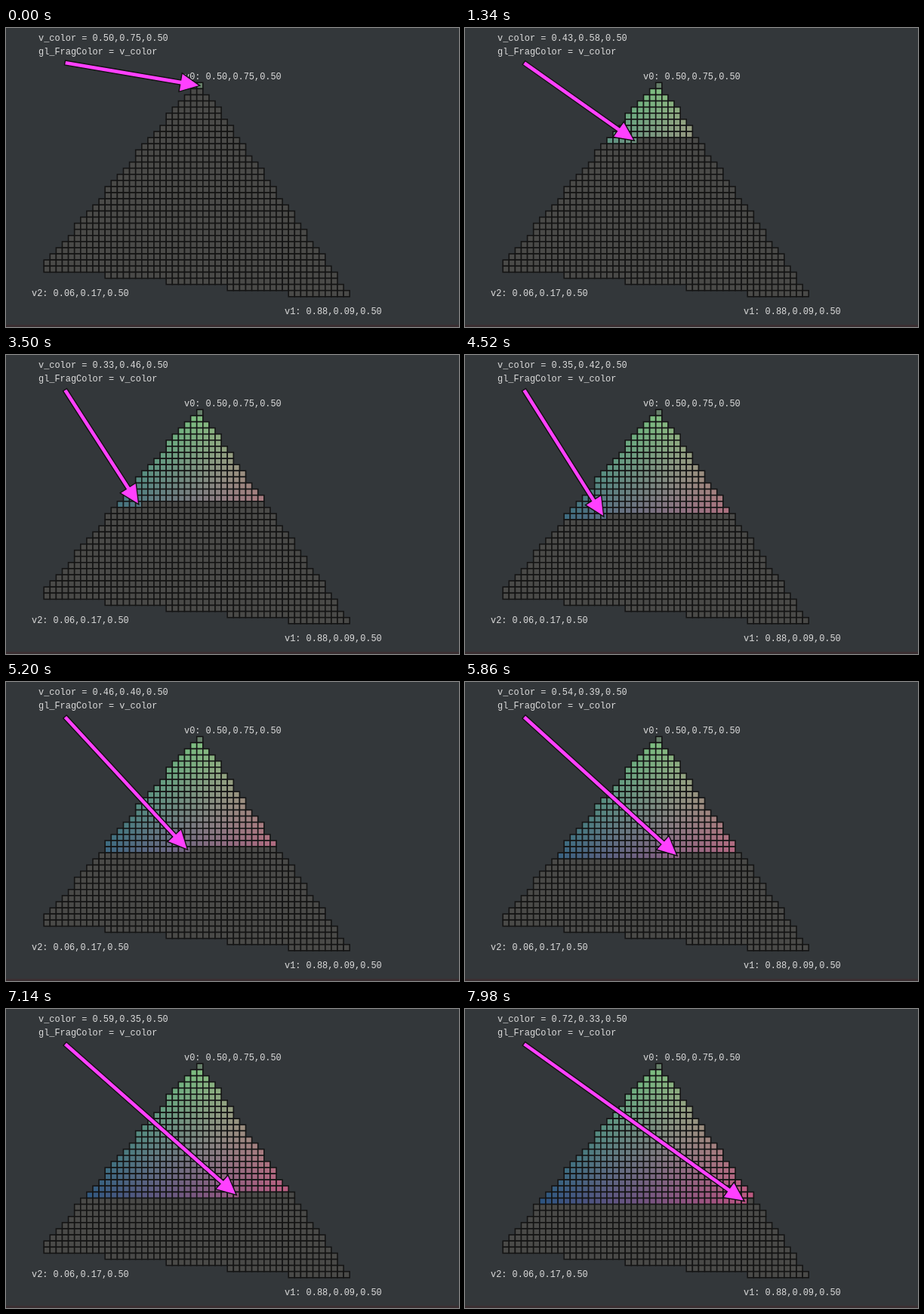
Animation of 600 by 396 pixels, one loop 8 s. Source, as an HTML page with a canvas:

```html
<!DOCTYPE html>
<html lang="en">
<head>
<meta charset="utf-8">
<title>Fragment interpolation</title>
<style>
  html, body { margin: 0; width: 100%; height: 100%; overflow: hidden; background: #33373a; }
  canvas { display: block; width: 600px; height: 396px; }
</style>
</head>
<body>
<canvas id="stage" width="600" height="396"></canvas>
<script>
const ctx = document.getElementById('stage').getContext('2d');
const LOOP = 8000, TICK = 20, CELLS_PER_TICK = 1.0355;
const SIZE = 8.1, LEFT = 50.2, TOP = 72.3, ROWS = 35;
const TAIL = { x: 78, y: 46 };

// Covered cells in scan order
const cells = [];
for (let row = 0; row < ROWS; row++) {
  const first = row <= 30 ? Math.floor(25 - row * 5 / 6 + 1e-6) : 10 * (row - 30);
  const last = Math.floor(25.2 + 0.7074 * row);
  for (let col = first; col <= last; col++) {
    cells.push({
      x: LEFT + col * SIZE,
      y: TOP + row * SIZE,
      color: [0.502 + 0.0162 * (col - 25) - 0.0006 * row, 0.751 - row / 52, 0.5]
    });
  }
}

const rgb = color => `rgb(${color.map(v => Math.round(v * 255)).join(',')})`;

function drawCell(cell, fill) {
  ctx.fillStyle = fill;
  ctx.fillRect(cell.x, cell.y, SIZE, SIZE);
  ctx.strokeRect(cell.x, cell.y, SIZE, SIZE);
}

function label(text, x, y) {
  ctx.fillStyle = '#dcdcdc';
  ctx.fillText(text, x, y);
}

function drawArrow(x, y) {
  const dx = x - TAIL.x, dy = y - TAIL.y;
  const length = Math.hypot(dx, dy), neck = length - 26;
  ctx.save();
  ctx.translate(TAIL.x, TAIL.y);
  ctx.rotate(Math.atan2(dy, dx));
  ctx.beginPath();
  ctx.moveTo(0, -3);
  ctx.lineTo(neck, -3);
  ctx.lineTo(neck, -12.5);
  ctx.lineTo(length, 0);
  ctx.lineTo(neck, 12.5);
  ctx.lineTo(neck, 3);
  ctx.lineTo(0, 3);
  ctx.closePath();
  ctx.fillStyle = '#ff40ff';
  ctx.fill();
  ctx.lineWidth = 1.4;
  ctx.strokeStyle = '#111';
  ctx.stroke();
  ctx.restore();
}

function render(time) {
  const tick = Math.floor(time / TICK);
  const current = Math.floor(tick * CELLS_PER_TICK + 0.4);

  ctx.fillStyle = '#33373a';
  ctx.fillRect(0, 0, 600, 396);
  ctx.fillStyle = '#3a2f32';
  ctx.fillRect(0, 393, 600, 3);

  ctx.lineWidth = 1.6;
  ctx.strokeStyle = '#141414';
  cells.forEach((cell, i) => {
    const fill = i === 0 ? '#66806a' : i <= current ? rgb(cell.color) : '#4a4a48';
    drawCell(cell, fill);
  });

  const active = cells[current];
  ctx.font = '11.93px "Liberation Mono", monospace';
  label('v_color = ' + active.color.map(v => v.toFixed(2)).join(','), 43, 17);
  label('gl_FragColor = v_color', 43, 35);
  label('v0: 0.50,0.75,0.50', 236, 68);
  label('v2: 0.06,0.17,0.50', 34, 355);
  label('v1: 0.88,0.09,0.50', 369, 379);

  drawArrow(active.x + SIZE / 2, active.y + SIZE / 2);
}

const start = performance.now();
function frame() {
  render((performance.now() - start) % LOOP);
  requestAnimationFrame(frame);
}
frame();
</script>
</body>
</html>
```
